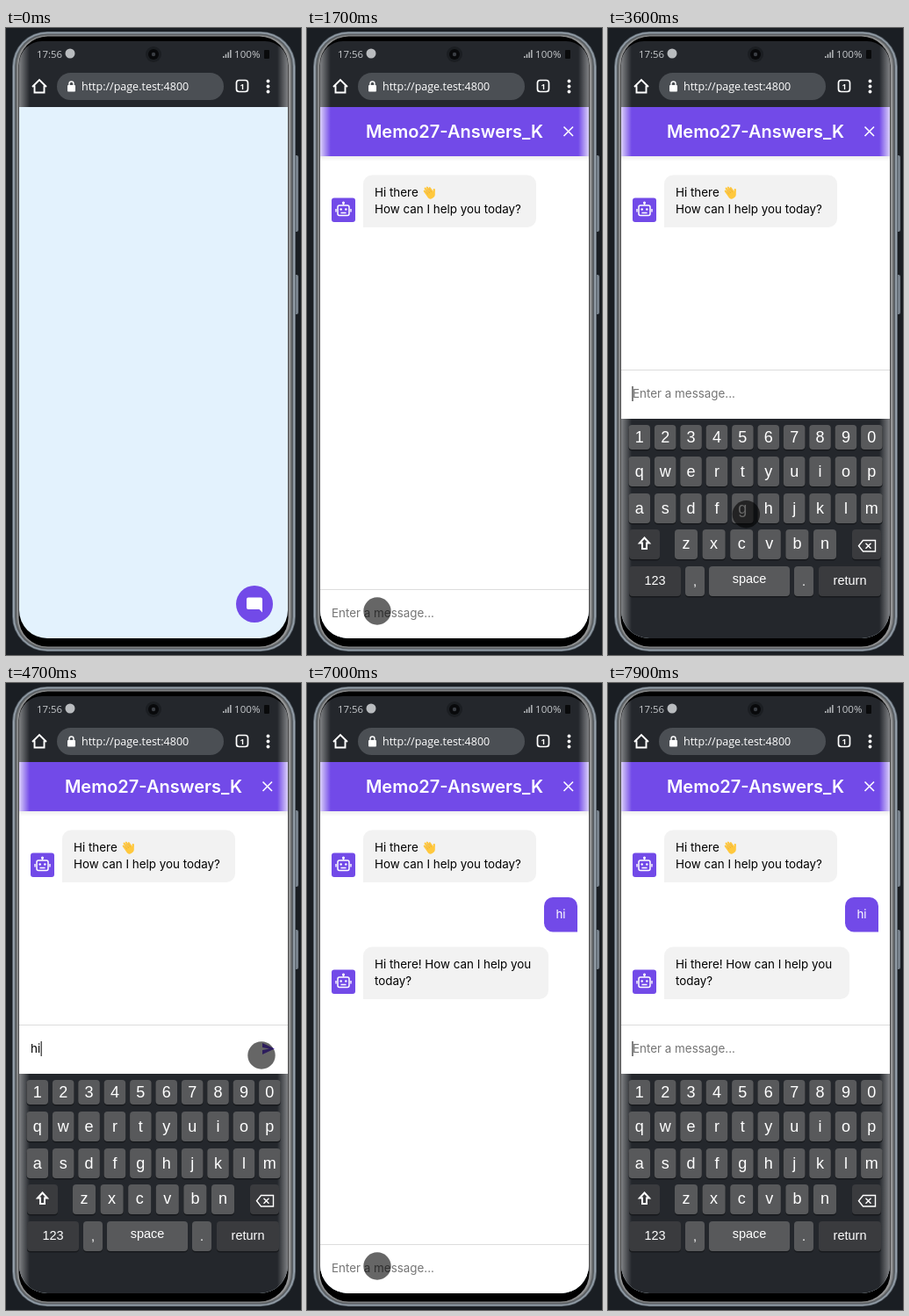
An HTML page with a canvas that plays this animation: 336 by 714 pixels, repeating every 8 s.

```html
<!DOCTYPE html>
<html lang="en">
<head>
<meta charset="utf-8">
<title>Chat on a phone</title>
<style>
html, body { margin: 0; width: 100%; height: 100%; overflow: hidden; background: #1a1e23; }
canvas { display: block; width: 336px; height: 714px; }
</style>
</head>
<body>
<canvas id="stage"></canvas>
<script>
const LOOP = 8000, STEP = 100;
const PURPLE = '#724ae8', DARK = '#24272c';
const UI = 'Inter, sans-serif', BAR = '"Open Sans", sans-serif', KEYS = '"Liberation Sans", Arial, sans-serif';

const canvas = document.getElementById('stage');
const c = canvas.getContext('2d');
const dpr = window.devicePixelRatio || 1;
canvas.width = 336 * dpr;
canvas.height = 714 * dpr;

// Touch point: time, x, y, opacity
const touch = [
  [100, 345, 692, 1], [900, 283.5, 653, 1], [1200, 283.5, 653, 1], [1700, 80, 664, 1],
  [1850, 80, 664, 1], [2200, 60, 735, 1], [2300, 60, 735, 0],
  [3000, 200, 622, 0], [3200, 195, 612, 1], [3700, 153, 547, 1], [3850, 153, 547, 1],
  [4150, 241, 505, 1], [4250, 241, 505, 1], [4600, 291, 424, 1], [4950, 291, 424, 1],
  [5600, 297, 413, 1], [5800, 301, 408, 1], [6600, 301, 408, 1], [7000, 80, 664, 1],
  [7200, 80, 664, 1], [7500, 60, 735, 1]
];

const ramp = (t, a, b) => Math.min(1, Math.max(0, (t - a) / (b - a)));
const smooth = p => p * p * (3 - 2 * p);
const lerp = (a, b, p) => a + (b - a) * p;

function box(x, y, w, h, r, fill) {
  c.beginPath();
  c.roundRect(x, y, w, h, r);
  c.fillStyle = fill;
  c.fill();
}

function disc(x, y, r, fill) {
  c.beginPath();
  c.arc(x, y, r, 0, 7);
  c.fillStyle = fill;
  c.fill();
}

function line(d, color, width = 1.5) {
  c.strokeStyle = color;
  c.lineWidth = width;
  c.stroke(new Path2D(d));
}

function shape(d, fill) {
  c.fillStyle = fill;
  c.fill(new Path2D(d));
}

function text(s, x, y, font, fill, align = 'left') {
  c.font = font;
  c.fillStyle = fill;
  c.textAlign = align;
  c.fillText(s, x, y);
}

function across(x0, x1, ...stops) {
  const g = c.createLinearGradient(x0, 0, x1, 0);
  stops.forEach(([at, color]) => g.addColorStop(at, color));
  return g;
}

// Light falling on the curved edges of the dark areas
function gloss(y, h, power = .42) {
  const fade = (x0, x1) => across(x0, x1, [0, `rgba(255,255,255,${power})`], [1, 'rgba(255,255,255,0)']);
  box(15, y, 12, h, 0, fade(15, 27));
  box(309, y, 12, h, 0, fade(321, 309));
}

function phone() {
  c.fillStyle = '#1a1e23';
  c.fillRect(0, 0, 336, 714);
  box(328, 145, 5, 87, 2, '#77818b');
  box(328, 281, 5, 45, 2, '#77818b');
  // Metal rim, from the outside in
  ['#59626b', '#98a3ad', '#8a949d', '#5a6066', '#5e6163', '#77797a', '#949596'].forEach((color, i) =>
    box(7 + i, 4 + i * .8, 323 - 2 * i, 706 - 1.6 * i, 40 - i, color));
  box(14.5, 9.5, 307, 695, 33, '#000');
}

function browserBar() {
  box(15, 15, 306, 75, 0, DARK);
  gloss(15, 75);
  text('17:56', 35, 34, '11.4px ' + BAR, '#c6c9cc');
  disc(73, 29, 5.5, '#b9bcbf');
  disc(168, 30, 9, '#1b1e22');
  disc(168, 30, 6, '#08090b');
  disc(168, 30, 2.2, '#3a3e44');
  for (let i = 0; i < 4; i++) box(247 + i * 2.7, 32 - i * 2.3, 1.5, 2 + i * 2.3, 0, '#b5b8bb');
  text('100%', 260, 34, '11.6px ' + BAR, '#c6c9cc');
  box(294, 25, 6, 10, 1, '#090a0b');

  line('M30 67 L38 59 L46 67 M32.5 65.5 V73.5 H43.5 V65.5', '#fff', 1.9);
  box(58, 51, 190, 31, 15.5, '#4b4f54');
  box(70, 65, 9, 7.5, 1, '#fff');
  line('M72 65 V63.5 A2.5 2.5 0 0 1 77 63.5 V65', '#fff', 1.4);
  text('http://page.test:4800', 86, 71, '12.5px ' + BAR, '#fff');
  c.beginPath();
  c.roundRect(262.5, 59.5, 13, 13, 3);
  c.strokeStyle = '#fff';
  c.lineWidth = 1.7;
  c.stroke();
  text('1', 269, 69.5, 'bold 9px ' + BAR, '#fff', 'center');
  [60.5, 66.5, 72.5].forEach(y => disc(298.5, y, 1.9, '#fff'));
}

function chatButton(p) {
  disc(283, 656, 21, PURPLE);
  if (p > 0) line('M278 651 L288 661 M288 651 L278 661', '#fff', 1.8);
  else shape('M276 648.5 H290 Q292 648.5 292 650.5 V665.5 L288.5 662 H276 Q274 662 274 660 V650.5 Q274 648.5 276 648.5 Z', '#fff');
}

function avatar(bottom) {
  c.save();
  c.translate(28, bottom - 27.5);
  box(0, 0, 27, 27.5, 3, PURPLE);
  c.beginPath();
  c.roundRect(7, 8.5, 13, 11.5, 2);
  c.strokeStyle = '#fff';
  c.lineWidth = 1.5;
  c.stroke();
  line('M13.5 8 V5.5 M5 12.5 V16 M22 12.5 V16 M10.5 17 H16.5', '#fff', 1.4);
  disc(13.5, 5.5, 1.5, '#fff');
  disc(10.7, 13, 1.2, '#fff');
  disc(16.3, 13, 1.2, '#fff');
  c.restore();
}

function botMessage(y, w, lines) {
  const h = 20.5 + lines.length * 19.5;
  box(64, y, w, h, [10, 10, 10, 0], '#f2f2f2');
  lines.forEach((s, i) => text(s, 77, y + 24.2 + i * 19.5, '13.4px ' + UI, '#000'));
  avatar(y + h - 6);
}

function wavingHand() {
  c.save();
  c.translate(139, 188);
  c.rotate(-.6);
  c.lineCap = 'round';
  box(-4, -1.5, 9, 8.5, 4, '#ffc83d');
  line('M-3 1 V-5 M-.6 0 V-7 M1.8 0 V-6.5 M4 1 V-4.5', '#ffc83d', 2);
  line('M4 4 L7 0', '#ffc83d', 2.3);
  line('M-1.8 0 V-4 M.6 0 V-4.5 M2.9 0 V-4', '#e09a25', .5);
  c.restore();
}

function chat(t, k) {
  const base = lerp(695, 445, k);
  box(15, 90, 306, base - 90, 0, '#fff');
  const shade = c.createLinearGradient(0, 146, 0, 152);
  shade.addColorStop(0, 'rgba(0,0,0,.07)');
  shade.addColorStop(1, 'rgba(0,0,0,0)');
  box(15, 146, 306, 6, 0, shade);
  box(15, 90, 306, 56, 0, PURPLE);
  text('Memo27-Answers_K', 168, 125, '600 20px ' + UI, '#fff', 'center');
  line('M292.5 112.5 L303 123 M303 112.5 L292.5 123', '#fff', 1.6);

  botMessage(167.5, 197, ['Hi there', 'How can I help you today?']);
  wavingHand();
  if (t >= 4900) {
    box(270, 244, 38, 39.5, [10, 10, 0, 10], PURPLE);
    text('hi', 289, 268, '13.4px ' + UI, '#fff', 'center');
  }
  if (t >= 6100) botMessage(300.5, 211, ['Hi there! How can I help you', 'today?']);
  else if (t >= 5500) botMessage(300.5, 91, ['Thinking...']);

  box(15, base - 56, 306, 1, 0, '#ddd');
  const typed = t < 3800 || t >= 4900 ? '' : t < 4200 ? 'h' : 'hi';
  text(typed || 'Enter a message...', 28, base - 24, '13.4px ' + UI, typed ? '#000' : '#757575');
  if (typed) shape('M292 410 L306 416.5 L292 423 V418 L300 416.5 L292 415 Z', PURPLE);
  if (k > 0 && (t < 4900 || t > 7400)) {
    const x = typed ? 28.5 + c.measureText(typed).width : 27.5;
    box(x, base - 37, 1, 17, 0, '#000');
  }
}

function key(x, y, w, h, label, size = 18, fill = '#58595b', lift = 0) {
  box(x, y + 1.5, w, h, 4, '#17191c');
  box(x, y, w, h, 4, fill);
  text(label, x + w / 2, y + h / 2 + size * .35 - lift, size + 'px ' + KEYS, '#fff', 'center');
}

function keyboard(k) {
  c.save();
  c.translate(0, 250 * (1 - k));
  box(15, 445, 306, 255, 0, DARK);
  gloss(445, 250);
  [['1234567890', 452, 28], ['qwertyuiop', 488, 34], ['asdfghjklm', 530, 34]].forEach(([row, y, h]) =>
    [...row].forEach((s, i) => key(23.5 + i * 29.4, y, 24.5, h, s)));
  [...'zxcvbn'].forEach((s, i) => key(76 + i * 31.6, 571, 26, 34, s, 18, '#58595b', 1));
  const special = '#3a3b3e';
  key(24, 571, 35, 34, '', 14, special);
  line('M41.5 580.5 L47 586.5 H44 V593 H39 V586.5 H36 Z', '#fff', 2);
  key(278, 571, 33, 34, '', 14, special);
  line('M290.5 583.5 H304.5 V596 H290.5 L285.5 589.7 Z M293.5 586.7 L299.5 592.7 M299.5 586.7 L293.5 592.7', '#fff', 1.4);
  key(24, 613, 59, 34, '123', 14.5, special, 1);
  key(88, 613, 22, 34, ',', 14.5);
  key(115, 613, 92, 34, 'space', 14.5, '#58595b', 3);
  key(212, 613, 22, 34, '.', 14.5);
  key(240, 613, 71, 34, 'return', 14.5, special, 1);
  c.restore();
}

function finger(t) {
  const i = touch.findIndex(p => p[0] > t);
  if (i < 1) return;
  const a = touch[i - 1], b = touch[i];
  const p = smooth(ramp(t, a[0], b[0]));
  disc(lerp(a[1], b[1], p), lerp(a[2], b[2], p), 15.7, `rgba(0,0,0,${.6 * lerp(a[3], b[3], p)})`);
}

function draw(t) {
  c.setTransform(dpr, 0, 0, dpr, 0, 0);
  const open = ramp(t, 1078, 1178);
  const k = smooth(ramp(t, 1900, 2200)) - smooth(ramp(t, 4900, 5150)) + smooth(ramp(t, 7500, 7800));

  phone();
  c.save();
  c.beginPath();
  c.roundRect(15, 15, 306, 680, [26, 26, 32, 32]);
  c.clip();
  box(15, 90, 306, 605, 0, '#e3f2fd');
  browserBar();
  chatButton(open);
  if (open > 0) {
    const s = .5 + open / 2;
    c.save();
    c.globalAlpha = Math.min(1, open * 1.6);
    c.translate(320, 695);
    c.scale(s, s);
    c.translate(-320, -695);
    chat(t, k);
    c.restore();
  }
  if (open === 1) gloss(90, 56, .75);
  if (k > 0) keyboard(k);
  c.restore();
  finger(t);
}

function tick(now) {
  draw(Math.floor(now % LOOP / STEP) * STEP);
  requestAnimationFrame(tick);
}
requestAnimationFrame(tick);
</script>
</body>
</html>
```
